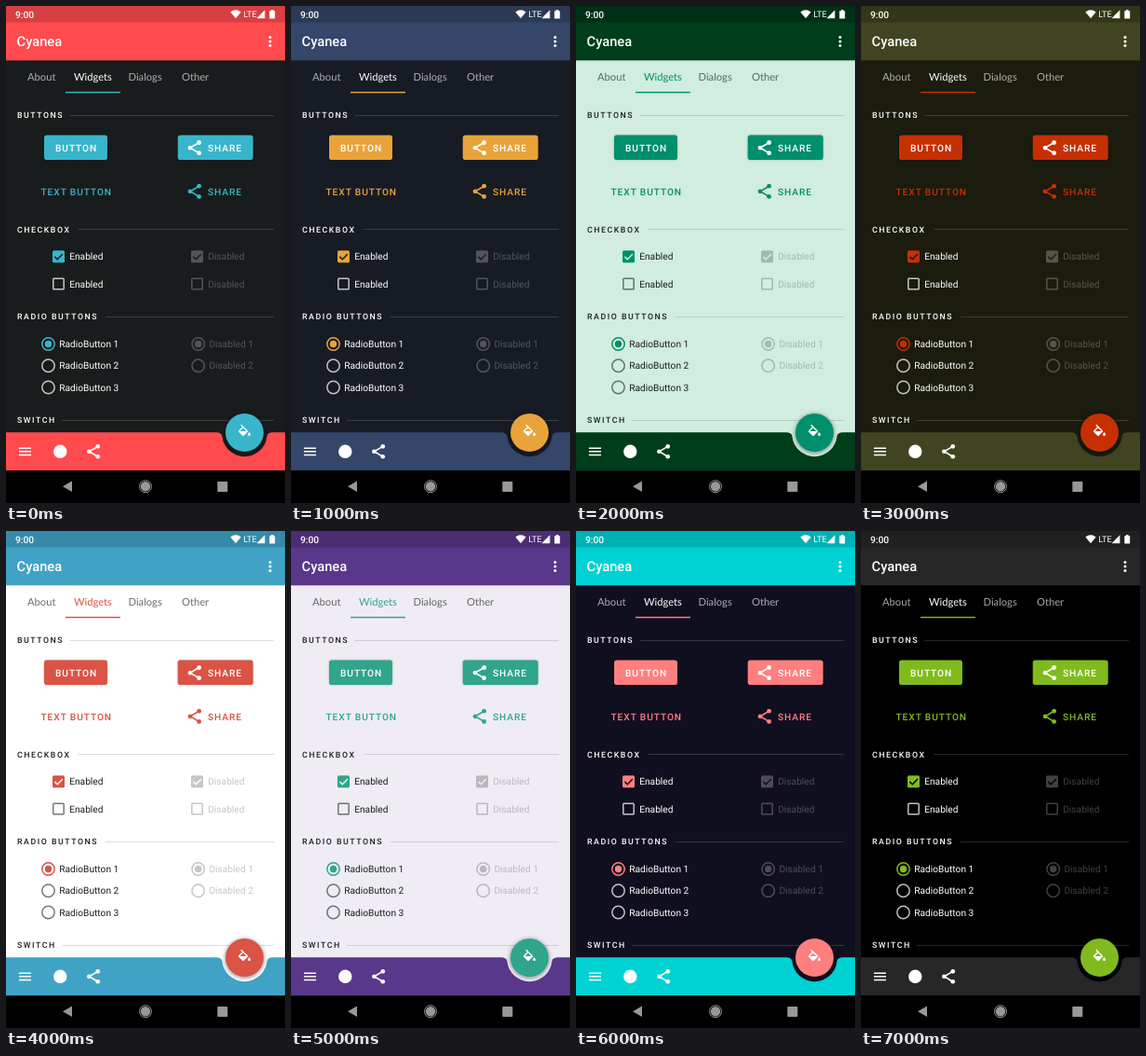
These frames come from a looping animation (300 px wide and 533 px high, 8000 ms). An HTML page:

```html
<!DOCTYPE html>
<html lang="en">
<head>
<meta charset="utf-8">
<style>
html, body { margin: 0; width: 100%; height: 100%; overflow: hidden; background: #000; }
svg { display: block; width: 300px; height: 533px; font: 10.2px Roboto, sans-serif; text-rendering: geometricPrecision; }
.bg { fill: var(--bg); }
.bar { fill: var(--bar); }
.accent { fill: var(--accent); color: var(--accent); }
.white { fill: #fff; color: #fff; }
.text { fill: var(--text); color: var(--text); }
.off { opacity: .25; }
.caps { font-weight: 500; letter-spacing: .91px; }
.head { font-size: 8.75px; font-weight: 500; letter-spacing: 1.55px; }
.tab { font: 11.2px Lato, sans-serif; }
.box { fill: none; stroke: var(--text); stroke-width: 1.5; }
.ring { fill: none; stroke: currentColor; stroke-width: 1.5; }
.idle { opacity: var(--idle); }
.off .idle { opacity: 1; }
.raised { filter: drop-shadow(0 .6px .8px rgba(0, 0, 0, .25)); }
.fab { filter: drop-shadow(0 1.5px 2.5px rgba(0, 0, 0, .5)); }
</style>
</head>
<body>
<svg id="stage" viewBox="0 0 300 533">
  <defs>
    <g id="share" fill="currentColor">
      <path d="M18 5 6 12 18 19" fill="none" stroke="currentColor" stroke-width="2"/>
      <circle cx="18" cy="5" r="3"/><circle cx="6" cy="12" r="3"/><circle cx="18" cy="19" r="3"/>
    </g>
  </defs>
  <rect class="bg" width="300" height="498.3"/>
  <rect class="bar" width="300" height="58.35"/>
  <rect fill="var(--status)" width="300" height="17.5"/>

  <g class="white">
    <text x="10" y="12.8" font-weight="500">9:00</text>
    <path d="M241.3 6.5Q247 2.2 252.7 6.5L247 13.3Z"/>
    <text x="255.3" y="12.4" font-size="9.2">LTE</text>
    <path d="M269.5 13.2H278.4V4.3Z"/>
    <path d="M283.3 5.2H285V4H287.5V5.2H289.2V13.6H283.3Z"/>
    <text x="11.6" y="43.3" font-size="14.7" font-weight="500">Cyanea</text>
    <circle cx="284" cy="33.6" r="1.5"/><circle cx="284" cy="38" r="1.5"/><circle cx="284" cy="42.4" r="1.5"/>
  </g>

  <g id="content"></g>

  <path class="bar" d="M0 457.3H226C229.5 457.3 231.6 458.4 232.4 461.2A24.2 24.2 0 0 0 280.6 461.2C281.4 458.4 283.5 457.3 287 457.3H300V498.3H0Z"/>
  <g class="white">
    <path transform="translate(11.7 469.1) scale(.729)" d="M3 6h18v2H3zm0 5h18v2H3zm0 5h18v2H3z"/>
    <circle cx="58.3" cy="477.8" r="7.2"/>
    <use href="#share" transform="translate(84.7 468.4) scale(.78)"/>
  </g>
  <circle class="accent fab" cx="256.5" cy="457.4" r="20.5"/>
  <path class="white" transform="translate(247.7 448.7) scale(.729)" d="M16.56 8.94 7.62 0 6.21 1.41 8.59 3.79 3.44 8.94Q2.5 10 3.44 11.06L8.94 16.56Q10 17.4 11.06 16.56L16.56 11.06Q17.5 10 16.56 8.94ZM5.21 10 10 5.21 14.79 10ZM19 11.5S17 13.67 17 15A2 2 0 0 0 21 15C21 13.67 19 11.5 19 11.5Z"/>

  <rect y="498.3" width="300" height="35"/>
  <g fill="#989898">
    <path d="M61 515.3 71 509.6V521Z"/>
    <circle cx="150" cy="515.3" r="5.2"/>
    <circle cx="150" cy="515.3" r="6.5" fill="none" stroke="#989898"/>
    <rect x="227.3" y="510" width="11" height="11" rx=".8"/>
  </g>
</svg>
<script>
const text = (x, y, label, cls) => `<text x="${x}" y="${y}" class="${cls}">${label}</text>`;

const section = (y, label, lineStart) => text(12, y + 3.3, label, 'head text') +
  `<rect class="text" opacity=".15" x="${lineStart}" y="${Math.floor(y)}" width="${288 - lineStart}" height="1"/>`;

const shareLabel = (y, cls) => `<g class="${cls}">
  <use href="#share" transform="translate(193.2 ${y - 9.7}) scale(.8)"/>
  ${text(217, y + 3.7, 'SHARE', 'caps')}</g>`;

const button = (x, width) =>
  `<rect class="accent raised" x="${x}" y="138.6" width="${width}" height="26.4" rx="2.8"/>`;

function checkbox(x, y, checked, enabled) {
  const mark = checked
    ? `<rect class="${enabled ? 'accent' : 'text'}" x="${x}" y="${y - 6.5}" width="13" height="13" rx="1.5"/>
       <path d="M${x + 2.4} ${y + .2}l2.9 2.9 5.6-5.8" fill="none" stroke="var(--bg)" stroke-width="1.5"/>`
    : `<rect class="box idle" x="${x + .8}" y="${y - 5.7}" width="11.4" height="11.4" rx=".8"/>`;
  return `<g class="${enabled ? '' : 'off'}">${mark}
    ${text(x + 18.2, y + 3.7, enabled ? 'Enabled' : 'Disabled', 'text')}</g>`;
}

function radio(x, y, label, checked, enabled) {
  const dot = checked ? `<circle cx="${x}" cy="${y}" r="3.7" fill="currentColor"/>` : '';
  return `<g class="${enabled ? '' : 'off'}">
    <g class="${checked && enabled ? 'accent' : 'text idle'}">
      <circle class="ring" cx="${x}" cy="${y}" r="6.7"/>${dot}</g>
    ${text(x + 11.7, y + 3.7, label, 'text')}</g>`;
}

document.getElementById('content').innerHTML = [
  '<g class="text" opacity=".65">',
  text(23, 80, 'About', 'tab'), text(131.5, 80, 'Dialogs', 'tab'), text(189, 80, 'Other', 'tab'),
  '</g>',
  '<g fill="var(--tab)">', text(73, 80, 'Widgets', 'tab'), '</g>',
  '<rect class="accent" x="64" y="91.9" width="59" height="1.45"/>',
  section(117, 'BUTTONS', 68.5),
  button(41, 68), text(53, 156, 'BUTTON', 'caps white'),
  button(184.7, 81), shareLabel(152.2, 'white'),
  text(37.5, 202.6, 'TEXT BUTTON', 'caps accent'), shareLabel(198.9, 'accent'),
  section(239.6, 'CHECKBOX', 78),
  section(333, 'RADIO BUTTONS', 107),
  section(444, 'SWITCH', 60),
  ...[268.7, 298].flatMap((y, i) => [checkbox(50, y, !i, true), checkbox(199, y, !i, false)]),
  ...[362.5, 385.7, 409].map((y, i) => radio(45.5, y, `RadioButton ${i + 1}`, !i, true)),
  ...[362.5, 385.7].map((y, i) => radio(206.7, y, `Disabled ${i + 1}`, !i, false)),
].join('');

// status bar, app bar, background, accent, light theme
const themes = [
  ['#d73f42', '#ff4a4e', '#181c1c', '#38b5cb'],
  ['#2b3a55', '#34466a', '#171b24', '#e8a33a'],
  ['#003016', '#003d1b', '#d0eddf', '#008f6b', true],
  ['#34361a', '#414420', '#1b1b0e', '#c53003'],
  ['#368aa9', '#40a3c6', '#ffffff', '#da5344', true],
  ['#4a2d73', '#59378a', '#f0ecf4', '#2fa58c', true],
  ['#00b1b3', '#00d2d4', '#100f1f', '#ff7f7f'],
  ['#202020', '#272727', '#000000', '#80bb1e'],
];
const style = document.getElementById('stage').style;
let shown = -1;

function draw(now) {
  const index = Math.floor(now / 1000) % themes.length;
  if (index !== shown) {
    shown = index;
    const [status, bar, bg, accent, light] = themes[index];
    const colors = {
      status, bar, bg, accent,
      text: light ? '#1c1f1e' : '#fff',
      tab: light ? accent : '#fff',
      idle: light ? .6 : .75,
    };
    for (const name in colors) style.setProperty('--' + name, colors[name]);
  }
  requestAnimationFrame(draw);
}
draw(performance.now());
</script>
</body>
</html>
```
